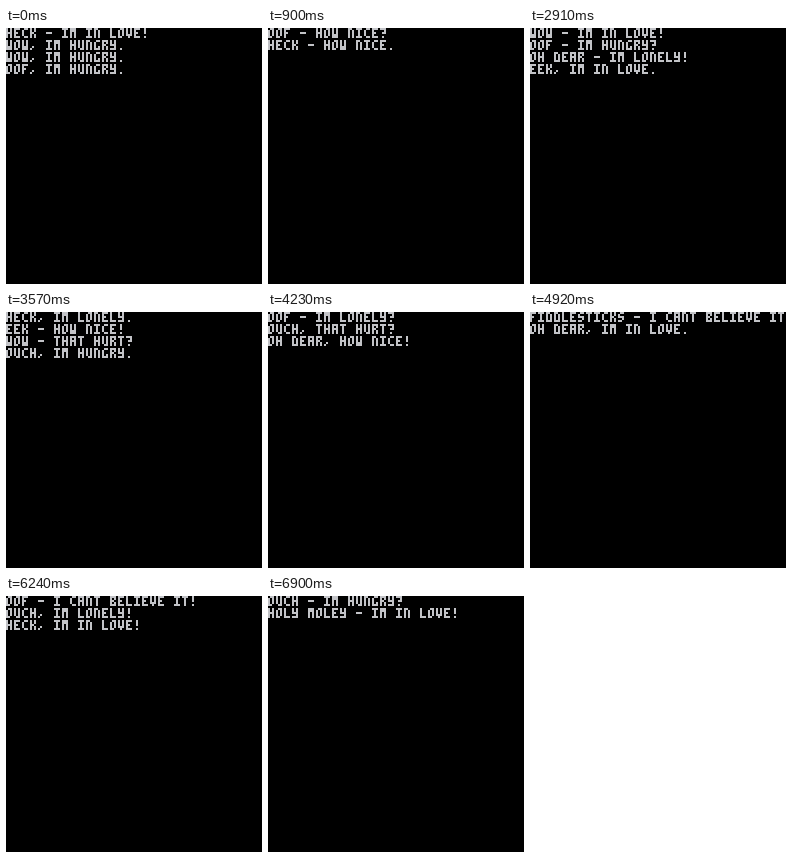
An HTML page that plays this animation: 256 by 256 pixels, repeating every 7170 ms.

```html
<!DOCTYPE html>
<html lang="en">
<head>
<meta charset="utf-8">
<title>Exclamations</title>
<style>
  html, body { margin: 0; width: 100%; height: 100%; overflow: hidden; background: #000; }
  svg { display: block; width: 100vw; height: 100vh; }
  path { fill: none; stroke: #c2c3c7; stroke-width: 1; stroke-linecap: square; }
</style>
</head>
<body>
<svg viewBox="0 0 128 128" shape-rendering="crispEdges" role="img">
  <g id="screen" transform="translate(.5 .5)"></g>
</svg>
<script>
const LOOP = 7170;
const ADVANCE = 4, LEADING = 6;

// Stroke font on a 3 by 5 cell
const GLYPHS = {
  A: "M0 4V0H2V4M0 2H2",
  B: "M2 1V0H0V4H2V3M0 2H1",
  C: "M2 0H1M0 1V3M1 4H2",
  D: "M1 0H0V4H2V1",
  E: "M2 0H0V4H2M0 2H1",
  F: "M2 0H0V4M0 2H1",
  G: "M2 0H1M0 1V4H2V3",
  H: "M0 0V4M2 0V4M0 2H2",
  I: "M0 0H2M1 0V4M0 4H2",
  K: "M0 0V4M2 0V1M0 2H1M2 3V4",
  L: "M0 0V4H2",
  M: "M0 4V0H2V4M0 1H2",
  N: "M0 4V0H1M2 1V4",
  O: "M2 3V0H1M0 1V4H1",
  R: "M0 4V0H2V1M0 2H1M2 3V4",
  S: "M2 0H1M0 1V2H2V3M0 4H1",
  T: "M0 0H2M1 0V4",
  U: "M0 0V3M1 4H2V0",
  V: "M0 0V3H2V0M1 4h0",
  W: "M0 0V4H2V0M0 3H2",
  Y: "M0 0V2H2M2 0V4H0",
  "!": "M1 0V2M1 4h0",
  "?": "M0 0H2V2H1M1 4h0",
  ".": "M1 4h0",
  ",": "M1 3h0M0 4h0",
  "-": "M0 2H2"
};

// Each page: start time in ms, then its lines
const PAGES = [
  [0, "HECK - IM IN LOVE!", "WOW, IM HUNGRY.", "WOW, IM HUNGRY.", "OOF, IM HUNGRY."],
  [240, "OOF - IM IN LOVE!", "WOW, THAT HURT."],
  [900, "OOF - HOW NICE?", "HECK - HOW NICE."],
  [1560, "EEK, IM LONELY!", "OUCH, HOW NICE."],
  [2220, "WOW, HOW NICE!", "HECK, IM HUNGRY?", "OOF, IM IN LOVE.", "EEK, THAT HURT!"],
  [2910, "WOW - IM IN LOVE!", "OOF - IM HUNGRY?", "OH DEAR - IM LONELY!", "EEK, IM IN LOVE."],
  [3570, "HECK, IM LONELY.", "EEK - HOW NICE!", "WOW - THAT HURT?", "OUCH, IM HUNGRY."],
  [4230, "OOF - IM LONELY?", "OUCH, THAT HURT?", "OH DEAR, HOW NICE!"],
  [4920, "FIDDLESTICKS - I CANT BELIEVE IT!", "OH DEAR, IM IN LOVE."],
  [5580, "WOW - IM LONELY!", "EEK, HOW NICE?"],
  [6240, "OOF - I CANT BELIEVE IT!", "OUCH, IM LONELY!", "HECK, IM IN LOVE!"],
  [6900, "OUCH - IM HUNGRY?", "HOLY MOLEY - IM IN LOVE!"]
];

const svg = document.querySelector("svg");
const screen_ = document.getElementById("screen");

function glyph(ch, col, row) {
  const d = GLYPHS[ch];
  return d ? `<path transform="translate(${col * ADVANCE} ${row * LEADING})" d="${d}"/>` : "";
}

function show([, ...lines]) {
  screen_.innerHTML = lines.map((line, row) =>
    [...line].map((ch, col) => glyph(ch, col, row)).join("")).join("");
  svg.setAttribute("aria-label", lines.join(" "));
}

let current;
function render(ms) {
  const t = ms % LOOP;
  const page = PAGES.filter(p => p[0] <= t).pop();
  if (page !== current) show(current = page);
}

const start = performance.now();
function tick() {
  render(performance.now() - start);
  requestAnimationFrame(tick);
}
tick();
</script>
</body>
</html>
```
